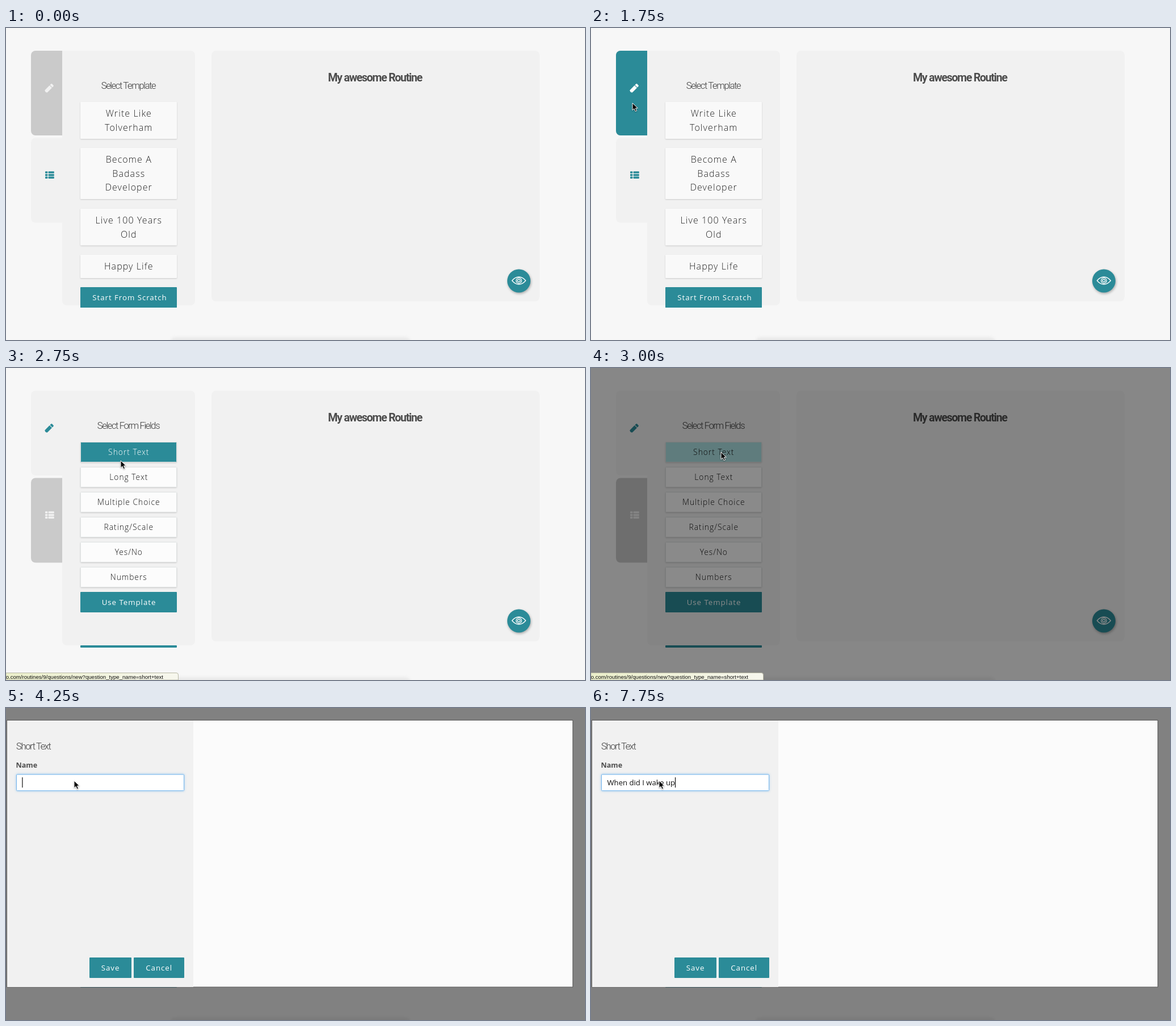
An HTML page that plays this animation: 1020x549 px, repeating every 8 s.

```html
<!DOCTYPE html>
<html lang="en">
<head>
<meta charset="utf-8">
<title>Routine builder</title>
<style>
  html, body { margin: 0; width: 100%; height: 100%; overflow: hidden; background: #f7f7f7; }
  svg { display: block; }
  text { font-family: "Open Sans", sans-serif; white-space: pre; }
  .head { font: 300 16.5px Roboto, sans-serif; letter-spacing: -1.35px; fill: #3c3c3c; }
  .title { font: 700 19.5px Roboto, sans-serif; letter-spacing: -1.25px; fill: #4c4c4c; }
  .mid { text-anchor: middle; }
  .card { font-size: 16px; font-weight: 300; letter-spacing: 1.1px; fill: #222; }
  .field { font-size: 13.8px; font-weight: 300; letter-spacing: 1px; fill: #111; }
  .btn { font-size: 13.3px; letter-spacing: .95px; fill: #fff; }
  .panel { fill: #f1f1f1; }
  .teal { fill: #2b8b98; }
  .lift { filter: drop-shadow(0 1px 1px rgba(0,0,0,.16)); }
</style>
</head>
<body>
<svg width="1020" height="549" viewBox="0 0 1020 549">
  <defs>
    <path id="tab" d="M99 0H52a8 8 0 0 0-8 8V141a8 8 0 0 0 8 8H99z"/>
    <linearGradient id="tip"><stop stop-color="#ebefca"/><stop offset="1" stop-color="#f7f7ee"/></linearGradient>
  </defs>

  <rect width="1020" height="549" fill="#f7f7f7"/>
  <rect x="290" y="544" width="422" height="20" rx="8" fill="#eaeaea" style="filter:blur(2px)"/>
  <rect class="panel" x="362" y="40" width="578" height="441" rx="8"/>
  <text class="title mid" x="650" y="93.5">My awesome Routine</text>
  <g style="filter:drop-shadow(1px 2px 2px rgba(0,0,0,.3))"><circle class="teal" cx="903.5" cy="445" r="20.5"/></g>
  <g fill="none" stroke="#fff" stroke-width="1.3">
    <path d="M891.5 444.5Q897 438 903.5 438T915.5 444.5Q910 451 903.5 451T891.5 444.5z"/>
    <circle cx="903.5" cy="444.5" r="4.8"/><circle cx="903.5" cy="444.5" r="2.3"/>
  </g>

  <use href="#tab" id="tab1" y="40"/>
  <use href="#tab" id="glow" y="40" class="teal"/>
  <use href="#tab" id="tab2" y="193.5"/>
  <path id="pencil" transform="translate(76 106) rotate(-45)" d="M-9.2 0L-8.2-2.8-5.4-3H4V3H-5.4L-8.2 2.8zM5-3H7.5Q9-3 9-1.5V1.5Q9 3 7.5 3H5z"/>
  <g id="list"></g>

  <rect class="panel" x="99" y="40" width="234" height="448" rx="8"/>
  <rect class="panel" x="99" y="40" width="10" height="303"/>
  <rect class="teal" x="131" y="488" width="170" height="4" rx="1"/>
  <g id="templates">
    <text class="head mid" x="215.5" y="107">Select Template</text>
  </g>
  <g id="fields">
    <text class="head mid" x="215.5" y="107">Select Form Fields</text>
  </g>

  <rect id="shade" width="1020" height="549"/>

  <g id="status">
    <path d="M0 536.5H300Q303.5 536.5 303.5 540V549H0z" fill="url(#tip)" stroke="#b9b9a6"/>
    <text x="277" y="547" text-anchor="end" style="font:9.6px 'Liberation Sans',Arial,sans-serif" fill="#111">o.com/routines/9/questions/new?question_type_name=short+text</text>
  </g>

  <g id="modal">
    <rect id="sheet" x="1.5" width="997" fill="#fbfbfb" stroke="#5a5a5a"/>
    <rect id="side" class="panel" x="2" width="328"/>
    <g id="form">
      <text class="head" x="18" y="72.5">Short Text</text>
      <text x="17.5" y="105" font-size="12.6" font-weight="700" fill="#4c4c4c">Name</text>
      <rect id="input" x="18.5" y="117" width="295" height="28.5" rx="1"/>
      <text id="typed" x="28.5" y="136" font-size="13.1" fill="#111"></text>
      <rect id="caret" y="122" width="1.2" height="18" fill="#111"/>
      <rect class="teal" x="147" y="439" width="74" height="36" rx="1"/>
      <rect class="teal" x="225" y="439" width="89" height="36" rx="1"/>
      <text class="btn mid" x="184" y="462">Save</text>
      <text class="btn mid" x="269.7" y="462">Cancel</text>
    </g>
  </g>

  <path id="cursor" d="M0 0V12.6L3 9.9 5.2 14.7 7.5 13.7 5.4 9H9.4z" stroke="#fff" stroke-width="1" style="filter:drop-shadow(0 1px 1px rgba(0,0,0,.35))"/>
</svg>
<script>
const $ = id => document.getElementById(id);
const set = (el, attrs) => { for (const k in attrs) el.setAttribute(k, attrs[k]); return el; };
const add = (parent, tag, attrs, text = "") => {
  const el = set(document.createElementNS("http://www.w3.org/2000/svg", tag), attrs);
  el.textContent = text;
  return parent.appendChild(el);
};
const show = (id, on) => { $(id).style.display = on ? "" : "none"; };

for (let i = 0; i < 3; i++) {
  const y = 252.3 + i * 4.6;
  add($("list"), "rect", { x: 69, y, width: 4.4, height: 3.5, rx: .8 });
  add($("list"), "rect", { x: 74.6, y, width: 10.2, height: 3.5, rx: .8 });
}

// Template cards
const cards = [
  [130, 65, "Write Like", "Tolverham"],
  [211, 90, "Become A", "Badass", "Developer"],
  [318, 64.5, "Live 100 Years", "Old"],
  [399, 41, "Happy Life"]
];
for (const [y, height, ...lines] of cards) {
  add($("templates"), "rect", { class: "lift", x: 131, y, width: 170, height, rx: 1, fill: "#f9f9f9" });
  lines.forEach((s, i) => add($("templates"), "text", { class: "card mid", x: 216.3, y: y + 26.3 + i * 24.5 }, s));
}
const tealButton = (parent, y, x, s) => {
  add(parent, "rect", { class: "teal", x: 131, y, width: 170, height: 36, rx: 1 });
  add(parent, "text", { class: "btn mid", x, y: y + 23 }, s);
};
tealButton($("templates"), 456, 218, "Start From Scratch");

// Form field buttons
const buttons = ["Short Text", "Long Text", "Multiple Choice", "Rating/Scale", "Yes/No", "Numbers"].map((s, i) => {
  const y = 131 + i * 44;
  const box = add($("fields"), "rect", { class: "lift", x: 131.5, y: y - .5, width: 169, height: 35, rx: 1, fill: "#fcfcfc", stroke: "#dfe3e3" });
  return [box, add($("fields"), "text", { class: "field mid", x: 216.3, y: y + 22 }, s)];
});
tealButton($("fields"), 394, 216.5, "Use Template");

const path = [
  [250, 198, 188], [500, 132, 166], [750, 74, 148], [1000, 74, 148], [1250, 73, 138], [1500, 73, 132],
  [2250, 73, 132], [2750, 202, 163], [3000, 229, 148], [3250, 220, 125], [3750, 140, 130], [4000, 120, 128]
];
function cursorAt(t) {
  const i = path.findIndex(p => p[0] > t);
  if (i < 0) return path[path.length - 1].slice(1);
  const a = path[Math.max(i - 1, 0)], b = path[i];
  const k = Math.max(0, (t - a[0]) / (b[0] - a[0] || 1));
  return [a[1] + (b[1] - a[1]) * k, a[2] + (b[2] - a[2]) * k];
}

const phrase = "When did I wake up";
const typing = [[4750, 1], [5000, 3], [5250, 5], [5500, 7], [5750, 9], [6000, 10], [6250, 11],
  [6500, 12], [6750, 14], [7000, 16], [7500, 17], [7750, 18]];

function draw(t) {
  const picked = t >= 2250, open = t >= 3250, focus = t >= 4000;
  show("templates", !picked);
  show("fields", picked);
  set($("tab1"), { fill: picked ? "#f1f1f1" : "#cacaca" });
  set($("tab2"), { fill: picked ? "#cacaca" : "#f1f1f1" });
  set($("glow"), { opacity: picked || t < 1250 ? 0 : Math.min(1, .35 + (t - 1250) / 500) });
  set($("pencil"), { fill: picked ? "#2b8b98" : t < 1250 ? "#f1f1f1" : "#fff" });
  set($("list"), { fill: picked ? "#f1f1f1" : "#2b8b98" });

  const hover = t === 2750;
  set(buttons[0][0], { fill: hover ? "#2b8b98" : t === 3000 ? "#aee3e5" : "#fcfcfc" });
  buttons[0][1].style.fill = hover ? "#fff" : "#111";

  set($("shade"), { opacity: t < 3000 ? 0 : open ? .48 : .455 });
  show("status", t >= 2750 && t < 3500);
  set($("status"), { opacity: open ? .2 : 1 });

  // The sheet drops 12px as it settles
  const rise = t < 3500 ? 12 : 0, top = rise ? 20 : 21, height = 491 - rise - top;
  show("modal", open);
  set($("sheet"), { y: top + .5, height: height - .5 });
  $("sheet").style.filter = rise ? "drop-shadow(0 4px 4px rgba(0,0,0,.5))" : "none";
  set($("side"), { y: top + 1, height: height - 1 });
  set($("form"), { transform: `translate(0 ${-rise})` });
  set($("input"), { fill: focus ? "#fff" : "#fbfbfb", stroke: focus ? "#74b5ec" : "#cbcbcb" });
  $("input").style.filter = focus ? "drop-shadow(0 0 2px rgba(100,175,235,.6))" : "none";

  const count = typing.reduce((n, [at, c]) => t >= at ? c : n, 0);
  $("typed").textContent = phrase.slice(0, count);
  show("caret", focus);
  set($("caret"), { x: 28.3 + (count ? $("typed").getComputedTextLength() : 0) });

  show("cursor", t >= 250);
  const [x, y] = cursorAt(t);
  set($("cursor"), { transform: `translate(${x} ${y})` });
}

// The screen refreshes four times a second
const start = performance.now();
function tick() {
  const t = (performance.now() - start) % 8000;
  draw(Math.floor(t / 250) * 250);
  requestAnimationFrame(tick);
}
draw(0);
requestAnimationFrame(tick);
</script>
</body>
</html>
```
